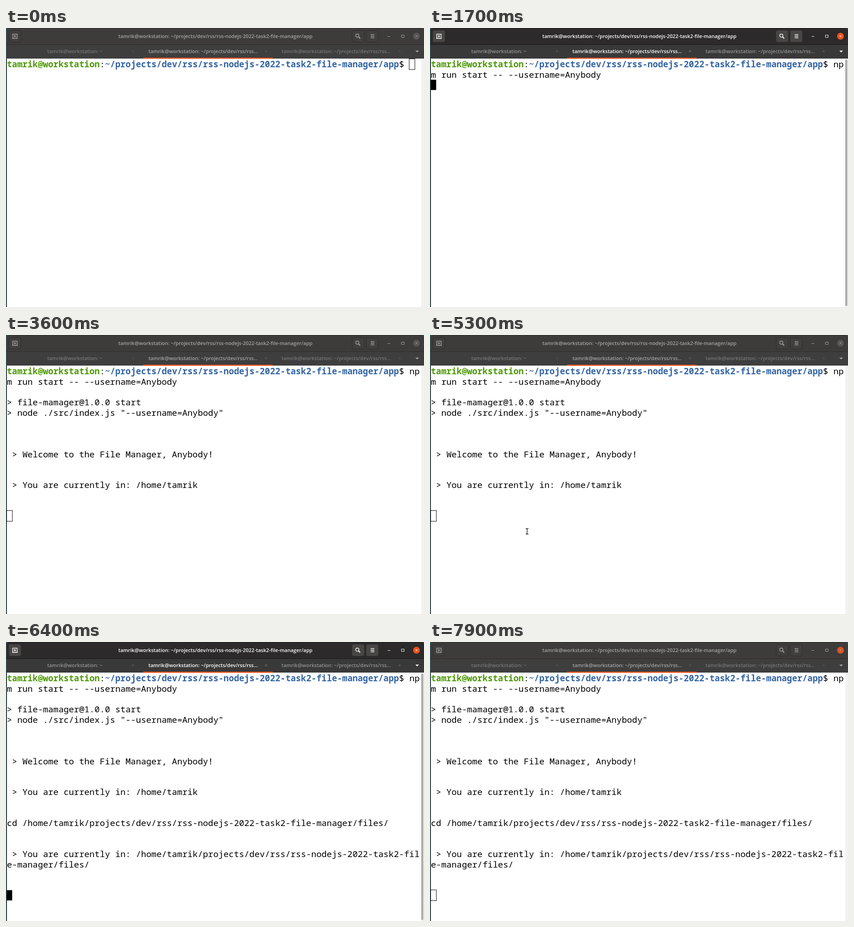
Write an HTML page that moves like this. It is 917 by 611 pixels and loops after 8000 ms.

```html
<!DOCTYPE html>
<html lang="en">
<head>
<meta charset="utf-8">
<title>Terminal</title>
<style>
  html, body { margin: 0; height: 100%; overflow: hidden; background: #fff; }
  svg { display: block; width: 917px; height: 611px; --bar: 0%; --icon: 0%; --close: 0%; }
  text { white-space: pre; }
  .ui { font: 600 11px "Open Sans", "Noto Sans", sans-serif; text-anchor: middle; }
  .term { font: 18.867px "Noto Sans Mono", "DejaVu Sans Mono", monospace; fill: #000; }
  .user { font-weight: 700; fill: #4e9a06; }
  .path { font-weight: 700; fill: #3465a4; }
  .head { fill: color-mix(in srgb, #2c2a2a var(--bar), #3d3c3b); }
  .tabs { fill: color-mix(in srgb, #393939 var(--bar), #3e3e3e); }
  .edge { fill: color-mix(in srgb, #1d1c1c var(--bar), #2c2b2b); }
  .lit { fill: color-mix(in srgb, #fff var(--bar), #a5a5a5); }
  .dim { fill: color-mix(in srgb, #949494 var(--bar), #767676); }
  .faint { stroke: color-mix(in srgb, #6c6c6c var(--bar), #575757); }
  .btn { fill: color-mix(in srgb, #484644 var(--icon), #403f3e); stroke: color-mix(in srgb, #3f3d3c var(--icon), #2d2c2b); }
  .icon { fill: none; stroke: color-mix(in srgb, #fff var(--icon), #a5a5a5); }
  .win { fill: none; stroke: color-mix(in srgb, #fff var(--bar), #a0a0a0); }
  .close { fill: color-mix(in srgb, #e95420 var(--close), #565656); }
  .thumb { fill: color-mix(in srgb, #aaa var(--bar), #f2f2f2); }
</style>
</head>
<body>
<svg id="stage" viewBox="0 0 917 611">
  <rect width="917" height="611" fill="#315a5d"/>
  <path class="edge" d="M1 611V6Q1 0 7 0H911Q917 0 917 6V611Z"/>
  <path class="head" d="M1 36V6Q1 1 7 1H911Q917 1 917 6V36Z"/>
  <rect class="tabs" x="1" y="37" width="916" height="30"/>
  <rect x="2" y="67" width="915" height="544" fill="#fff"/>
  <rect x="911" y="67" width="6" height="544" fill="#f2f2f2"/>
  <rect class="thumb" x="911" y="69" width="4.5" height="540" rx="2"/>
  <rect x="301" y="65" width="284" height="2.5" fill="#e95420"/>

  <g class="btn">
    <rect x="6.5" y="5.5" width="26" height="25" rx="3"/>
    <rect x="759.5" y="5.5" width="26" height="25" rx="3"/>
    <rect x="790.5" y="5.5" width="26" height="25" rx="3"/>
  </g>
  <g class="icon" stroke-width="1.4">
    <path d="M14.7 13.5H24.5V22.5H14.7ZM17 18H22M19.5 15.5V20.5M13.5 22.8H25.5"/>
    <circle cx="770.7" cy="16.7" r="3.4"/>
    <path d="M773.2 19.2L777 23" stroke-width="2"/>
    <path d="M800 14.5H808M800 18H808M800 21.5H808"/>
  </g>
  <path class="win" d="M837 18.5H843M867.5 15.5H873.5V20.5H867.5Z"/>
  <circle class="close" cx="900.5" cy="18" r="7.5"/>
  <path class="win" d="M898.5 16L902.5 20M902.5 16L898.5 20"/>

  <g class="ui" id="labels"></g>
  <path class="faint" d="M276.5 49L280.5 53M280.5 49L276.5 53M861.5 49L865.5 53M865.5 49L861.5 53"/>
  <path class="faint" d="M568.5 49L572.5 53M572.5 49L568.5 53" style="stroke-width:1.2"/>
  <path class="lit" d="M898 49.5H906L902 53.5Z"/>

  <g class="term" id="lines"></g>
  <rect id="cursor" stroke="#000"/>
  <g id="beam" fill="none">
    <path d="M-3 -6H3M-3 6H3M0 -6V6" stroke="#fff" stroke-width="3.5"/>
    <path d="M-3 -6H-1L0 -5L1 -6H3M-3 6H-1L0 5L1 6H3M0 -5V5" stroke="#222" stroke-width="1.4"/>
  </g>
</svg>
<script>
const LOOP = 8000, STEP = 100, CELL_W = 11.32, CELL_H = 22.64, LEFT = 2, TOP = 68;
const host = "tamrik@workstation";
const project = "projects/dev/rss/rss-nodejs-2022-task2-file-manager";
const home = "/home/tamrik";
const $ = id => document.getElementById(id);

function addText(parent, x, y, cls, str) {
  const el = document.createElementNS("http://www.w3.org/2000/svg", "text");
  el.setAttribute("x", x);
  el.setAttribute("y", y);
  el.setAttribute("class", cls);
  el.textContent = str;
  return parent.appendChild(el);
}

const tabTitle = `${host}: ~/projects/dev/rss/rss…`;
addText($("labels"), 459.5, 22, "lit", `${host}: ~/${project}/app`);
addText($("labels"), 151, 55, "dim", `${host}: ~`);
addText($("labels"), 432.5, 55, "lit", tabTitle);
addText($("labels"), 724.5, 55, "dim", tabTitle);

// time shown, row, column, text, class
const lines = [
  [0, 0, 0, host, "user"],
  [0, 0, 18, ":"],
  [0, 0, 19, `~/${project}/app`, "path"],
  [0, 0, 76, "$"],
  [1400, 0, 78, "np"],
  [1400, 1, 0, "m run start -- --username=Anybody"],
  [2100, 3, 0, "> file-mamager@1.0.0 start"],
  [2100, 4, 0, '> node ./src/index.js "--username=Anybody"'],
  [2200, 8, 0, " > Welcome to the File Manager, Anybody!"],
  [2400, 11, 0, ` > You are currently in: ${home}`],
  [6000, 14, 0, `cd ${home}/${project}/files/`],
  [6400, 17, 0, ` > You are currently in: ${home}/${project.slice(0, -8)}`.slice(0, 80)],
  [6400, 18, 0, "e-manager/files/"],
].map(([at, row, col, str, cls = ""]) => ({
  at, el: addText($("lines"), LEFT + col * CELL_W, TOP + 18.4 + row * CELL_H, cls, str)
}));

// time, row, column
const cursorStops = [[0, 0, 78], [1400, 1, 33], [1700, 2, 0], [2100, 6, 0], [2200, 11, 0],
  [2400, 14, 0], [6000, 14, 74], [6400, 21, 0]];
// time, x, y; no place means hidden
const beamStops = [[0], [500, 123, 387], [600, 110, 399], [800, 112, 396], [1700],
  [5300, 213, 430], [5400, 223, 422], [6400]];
// time, focused
const focusStops = [[0, 0], [800, 1], [3300, 0], [5500, 1], [7800, 0]];

const last = (stops, t) => stops.filter(s => s[0] <= t).pop();
const clamp = v => Math.min(1, Math.max(0, v));

function draw(t) {
  for (const { at, el } of lines) el.style.display = t >= at ? "" : "none";

  const [since, focused] = last(focusStops, t);
  const age = since ? t - since + STEP : LOOP;
  const fade = (name, delay, span) => {
    const p = clamp((age - delay) / span);
    $("stage").style.setProperty(name, 100 * (focused ? p : 1 - p) + "%");
  };
  fade("--bar", 0, 200);
  fade("--icon", 0, focused ? 400 : 200);
  fade("--close", focused ? 0 : 180, 200);

  const [, row, col] = last(cursorStops, t);
  const grow = focused ? 0 : 0.5;
  const set = (k, v) => $("cursor").setAttribute(k, v);
  set("x", LEFT + col * CELL_W - grow);
  set("y", TOP + row * CELL_H - grow);
  set("width", 11.5 + 2 * grow);
  set("height", 22.5 + 2 * grow);
  set("fill", focused ? "#000" : "none");
  set("stroke-width", focused ? 0 : 1);
  const blinkOff = (t >= 2300 && t < 2900) || (t >= 7000 && t < 7600);
  set("visibility", blinkOff ? "hidden" : "visible");

  const [, x, y] = last(beamStops, t);
  $("beam").style.display = x ? "" : "none";
  if (x) $("beam").setAttribute("transform", `translate(${x} ${y})`);
}

const start = performance.now();
function tick() {
  const t = (performance.now() - start) % LOOP;
  draw(Math.floor(t / STEP) * STEP);
  requestAnimationFrame(tick);
}
tick();
</script>
</body>
</html>
```
